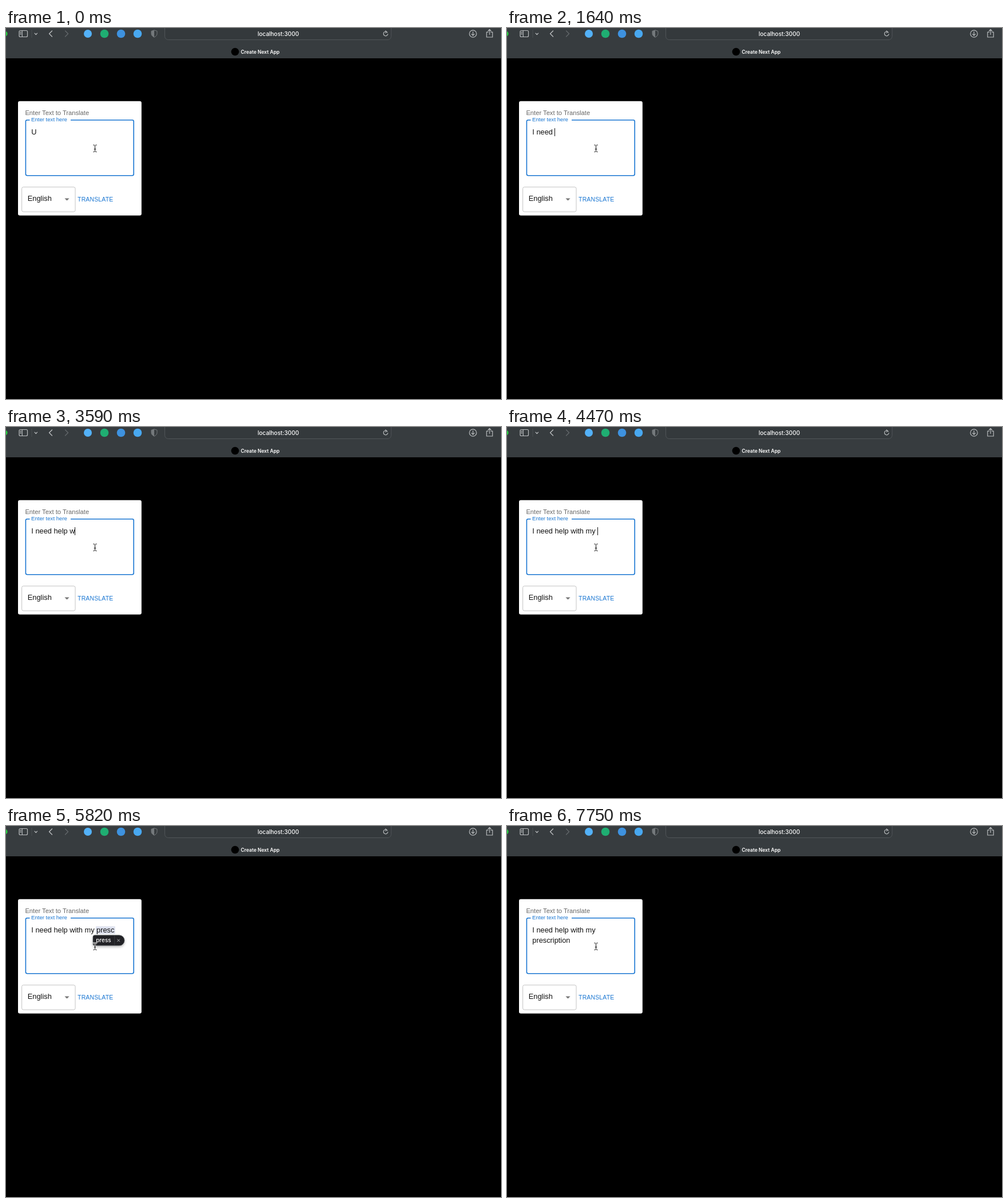
Write an HTML page that moves like this. It is 865 by 648 pixels and loops after 8000 ms.

```html
<!DOCTYPE html>
<html lang="en">
<head>
<meta charset="utf-8">
<title>Translate form</title>
<style>
  html, body { margin: 0; width: 100%; height: 100%; overflow: hidden; background: #000; }
  svg { display: block; width: 865px; height: 648px; }
  text { font-family: "Liberation Sans", Arial, sans-serif; white-space: pre; }
  .ui { font-family: Inter, Roboto, sans-serif; fill: #fff; }
  .body { font-size: 12.8px; fill: #111; }
  .icon { fill: none; stroke: #b9bcbe; stroke-width: 1.2; stroke-linecap: round; stroke-linejoin: round; }
</style>
</head>
<body>
<svg viewBox="0 0 865 648" xmlns="http://www.w3.org/2000/svg">
  <defs>
    <filter id="shadow" x="-20%" y="-40%" width="140%" height="200%">
      <feDropShadow dx="0" dy="2" stdDeviation="2" flood-color="#000" flood-opacity=".3"/>
    </filter>
  </defs>
  <rect width="865" height="648"/>

  <!-- browser bar -->
  <rect width="865" height="52.5" fill="#373c3f"/>
  <rect y="51.8" width="865" height=".8" fill="#42474a"/>
  <circle cx="-2" cy="10" r="4.7" fill="#28c840"/>
  <g class="icon">
    <rect x="23" y="4.5" width="14.5" height="11" rx="2"/>
    <path d="M28.3 4.5v11M24.8 7h1.7M24.8 9h1.7M24.8 11h1.7"/>
    <path d="M50 9.2l2.3 2.3 2.3-2.3"/>
    <path d="M80.5 5l-5 5 5 5" stroke-width="1.4"/>
    <path d="M103.5 5l5 5-5 5" stroke="#62676a" stroke-width="1.4"/>
    <circle cx="816" cy="10" r="6.2"/>
    <path d="M816 6.5v6.5M813.5 10.7l2.5 2.5 2.5-2.5"/>
    <path d="M842.5 7.2h-2.7v8.8h10.4V7.2h-2.7M845 11.5V2.7M842.5 5l2.5-2.5 2.5 2.5"/>
  </g>
  <path d="M45 3v14" stroke="#4a4f52"/>
  <circle cx="143" cy="10" r="7" fill="#53b1f8"/>
  <circle cx="172" cy="10" r="7.3" fill="#1fae72"/>
  <circle cx="201" cy="10" r="7.3" fill="#3e92df"/>
  <circle cx="230" cy="10" r="7.3" fill="#48a8f0"/>
  <path d="M259 3.8l5 1.6v4.3c0 3-2 5-5 6.5-3-1.5-5-3.5-5-6.5V5.4z" fill="none" stroke="#74797c"/>
  <path d="M259 3.8v12.4c-3-1.5-5-3.5-5-6.5V5.4z" fill="#74797c"/>
  <rect x="277.5" y="-8" width="395.5" height="28.5" rx="6" fill="#34393c" stroke="#505558"/>
  <text class="ui" x="475.8" y="14" font-size="10" font-weight="500" text-anchor="middle">localhost:3000</text>
  <path class="icon" d="M666.5 7.8a3.8 3.8 0 1 0 .7 2.7M663 5l2.3 1.7-2 2" stroke-width="1.1"/>
  <circle cx="400.3" cy="41.5" r="6.8" fill="#000"/>
  <text class="ui" x="410.3" y="44.8" font-size="8.5" font-weight="600">Create Next App</text>

  <!-- form card -->
  <rect x="21" y="127.7" width="215.8" height="199.8" rx="3.2" fill="#fff"/>
  <text x="33.4" y="152" font-size="11.2" fill="#666">Enter Text to Translate</text>
  <rect x="34.4" y="160.7" width="188.8" height="97" rx="2.6" fill="none" stroke="#1976d2" stroke-width="1.6"/>
  <rect x="41.5" y="158" width="71.5" height="5" fill="#fff"/>
  <text x="44" y="163.2" font-size="9.6" fill="#1976d2">Enter text here</text>
  <rect x="27.6" y="277.8" width="93.4" height="43.2" rx="2.8" fill="none" stroke="#c4c4c4"/>
  <text class="body" x="37.8" y="302.4">English</text>
  <path d="M102.4 297.5h8.2l-4.1 4.1z" fill="#757575"/>
  <text x="125.1" y="302.6" font-size="10.4" letter-spacing=".2" fill="#1976d2">TRANSLATE</text>

  <!-- typed text -->
  <rect id="mark" x="157" y="175.3" width="33.7" height="13.2" fill="#dde1ee"/>
  <text class="body" id="line1" x="44.3" y="185.7"></text>
  <text class="body" id="line2" x="44.3" y="203.9"></text>
  <rect id="caret" width="1" height="14" fill="#111"/>

  <!-- spelling bubble -->
  <g id="bubble">
    <path d="M155 190.8h43a9 9 0 0 1 0 18h-43a3 3 0 0 1-3-3v-12a3 3 0 0 1 3-3z"
      fill="#202327" stroke="#4a4d51" stroke-width=".6" filter="url(#shadow)"/>
    <path d="M189.7 191.2v17.2" stroke="#3c4044" stroke-width=".8"/>
    <text class="ui" x="157.2" y="203" font-size="10" font-weight="500">press</text>
    <path d="M194.3 197.5l4.6 4.6M198.9 197.5l-4.6 4.6" stroke="#b5b8bb"/>
  </g>

  <!-- mouse pointer -->
  <g fill="none" stroke-linecap="round">
    <path id="beam" d="M152.8 204.2q2.2 0 2.7 1.3q.5-1.3 2.7-1.3M155.5 205.5v9.6M152.8 216.4q2.2 0 2.7-1.3q.5 1.3 2.7 1.3M154.2 211.5h2.6" stroke="#fff" stroke-width="2.4"/>
    <use href="#beam" id="beamInk"/>
    <path d="M152.8 204.2q2.2 0 2.7 1.3q.5-1.3 2.7-1.3M155.5 205.5v9.6M152.8 216.4q2.2 0 2.7-1.3q.5 1.3 2.7 1.3M154.2 211.5h2.6" stroke="#111"/>
  </g>
</svg>
<script>
const LOOP = 8000;
const LINE = "I need help with my ";
const WORD = "prescription ";
const WRAP_AT = 10;   // letters of WORD that force a new line

// [start ms, characters typed]
const typing = [
  [450, 0], [600, 1], [900, 2], [1050, 3], [1200, 4], [1350, 5], [1490, 6], [1640, 7],
  [2690, 8], [2840, 9], [2990, 11], [3140, 12],
  [3590, 13], [3740, 14], [3890, 16], [4030, 17], [4180, 18],
  [4470, 20], [4620, 21], [4770, 23], [4920, 24], [5370, 25],
  [6110, 29], [6410, 30], [6560, 31], [6860, 33], [7150, 32]
];
const caretOff = [[0, 450], [2240, 2690], [5670, 6110], [7750, LOOP]];
const bubbleTime = [5670, 6110];

const $ = id => document.getElementById(id);
const [line1, line2, caret, mark, bubble] = ["line1", "line2", "caret", "mark", "bubble"].map($);
const within = (t, [from, to]) => t >= from && t < to;
const show = (el, on) => el.setAttribute("visibility", on ? "visible" : "hidden");
$("beamInk").remove();

// Pen position after a string, from the font's own metrics
const pen = document.createElement("canvas").getContext("2d");
pen.font = '12.8px "Liberation Sans", Arial, sans-serif';
const widthOf = s => pen.measureText(s).width;

function draw(t) {
  const step = typing.filter(([start]) => start <= t).pop();
  const typed = step ? (LINE + WORD).slice(0, step[1]) : "U";
  const wrapped = typed.length >= LINE.length + WRAP_AT;
  const first = wrapped ? LINE : typed;
  const second = wrapped ? typed.slice(LINE.length) : "";
  line1.textContent = first;
  line2.textContent = second;

  caret.setAttribute("x", Math.round(44.3 + widthOf(wrapped ? second : first)));
  caret.setAttribute("y", wrapped ? 192.5 : 175);
  show(caret, !caretOff.some(span => within(t, span)));

  const hint = within(t, bubbleTime);
  show(mark, hint);
  show(bubble, hint);
  bubble.setAttribute("opacity", t < 5820 ? 0.6 : 1);
}

const begin = performance.now();
function tick() {
  draw((performance.now() - begin) % LOOP);
  requestAnimationFrame(tick);
}
tick();
</script>
</body>
</html>
```
